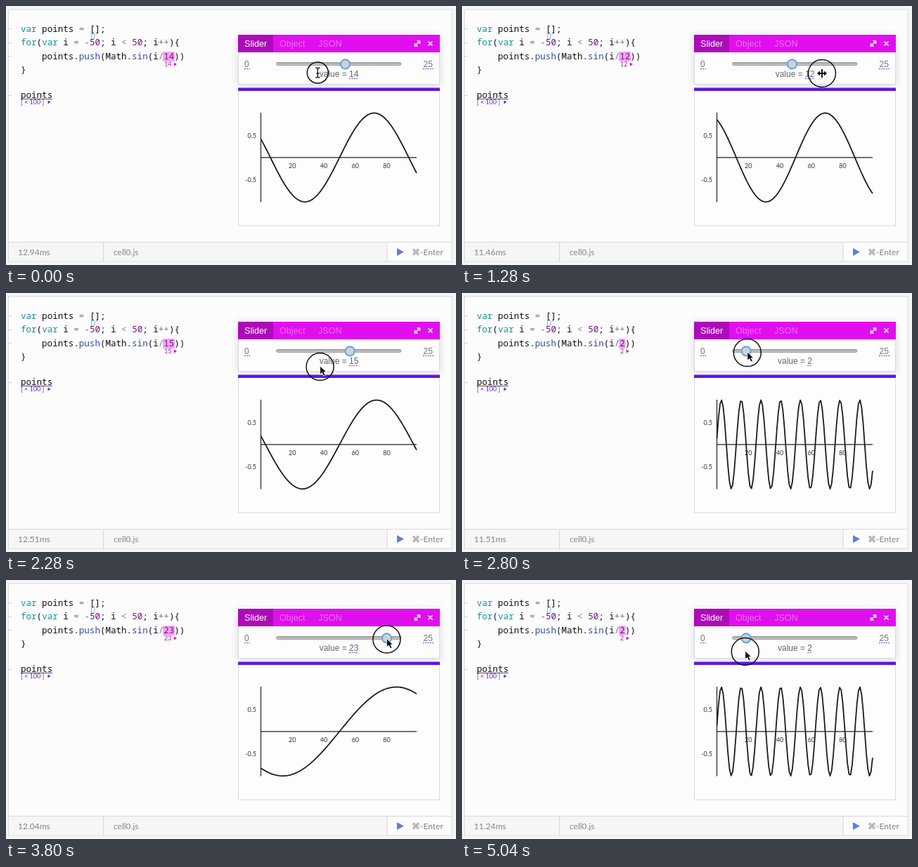
An HTML page that plays this animation: 640x369 px, repeating every 5.08 s.

```html
<!DOCTYPE html>
<html lang="en">
<head>
<meta charset="utf-8">
<title>Slider and sine plot</title>
<style>
html, body { margin: 0; width: 100%; height: 100%; overflow: hidden; background: #f5f5f5; }
svg { display: block; }
text { white-space: pre; }
.code { font: 12.55px "Noto Sans Mono", monospace; fill: #111; }
.kw { fill: #1591a0; } .num { fill: #770f80; } .op { fill: #777; } .fn { fill: #2f4f9f; }
.lato { font-family: Lato, sans-serif; }
.bar { font-size: 12px; fill: #858585; }
.note { font-size: 9px; }
.axis { font-size: 9px; fill: #333; }
.ui { font: 12px "Liberation Sans", Arial, sans-serif; fill: #777; }
.tab { font-size: 12.6px; fill: #fff; }
.dots { stroke: #5a3fc0; stroke-dasharray: 2 1.3; }
.white { stroke: #fff; stroke-width: 1.6; fill: none; }
</style>
</head>
<body>
<svg width="640" height="369" viewBox="0 0 640 369">
  <defs>
    <filter id="shadow" x="-10%" y="-20%" width="120%" height="150%">
      <feDropShadow dx="0" dy="1" stdDeviation="5" flood-color="#447" flood-opacity=".2"/>
    </filter>
    <linearGradient id="groove" x2="0" y2="1">
      <stop stop-color="#8e8e8e"/><stop offset=".4" stop-color="#bbb"/><stop offset="1" stop-color="#c8c8c8"/>
    </linearGradient>
  </defs>

  <rect x="3.5" y="5" width="630.5" height="359" fill="#fcfcfc" stroke="#d9d9de"/>
  <rect x="4" y="336" width="538" height="27.5" fill="#f6f6f6"/>
  <path d="M4 336.5H634M138.5 336V364M542 336V364" stroke="#d6d6e6"/>
  <path d="M3 32.5h5M3 52.5h5M3 71.5h5M3 127.5h5" stroke="#ccc"/>

  <rect id="mark" x="223" y="65" height="14" fill="#f3a6f3"/>
  <g class="code">
    <text x="21" y="37"><tspan class="kw">var</tspan> points <tspan class="op">=</tspan> [];</text>
    <text x="21" y="56"><tspan class="kw">for</tspan>(<tspan class="kw">var</tspan> i <tspan class="op">=</tspan> <tspan class="op">-</tspan><tspan class="num">50</tspan>; i <tspan class="op">&lt;</tspan> <tspan class="num">50</tspan>; i<tspan class="op">++</tspan>){</text>
    <text x="51.1" y="76">points.<tspan class="fn">push</tspan>(Math.<tspan class="fn">sin</tspan>(i<tspan class="op">/</tspan><tspan class="num" id="codeValue"></tspan>))</text>
    <text x="21" y="95">}</text>
    <text x="21" y="131">points</text>
  </g>
  <path d="M21 132.5H66" stroke="#555"/>
  <path d="M123 39.5h-1.5v6.500h1.500M124.500 39.500h1.500v6.500h-1.500" fill="none" stroke="#7fb4e6"/>
  <g class="lato note">
    <text x="21" y="140" fill="#6a22e0">[ × 100 ]</text><path d="M59.500 134.500v5l4-2.500z" fill="#6a22e0"/>
    <text id="hint" x="225" y="86" fill="#c210c8"></text><path id="hintArrow" d="M0 80.500v5l4-2.500z" fill="#c210c8"/>
  </g>

  <g class="lato bar">
    <text id="ms" x="17" y="355"></text>
    <text x="153" y="355">cell0.js</text>
    <text x="577" y="355">⌘-Enter</text>
  </g>
  <path d="M556 345v11l10-5.500z" fill="#5b7fe0"/>

  <rect x="330.500" y="41.500" width="286" height="70" fill="#fdfdfd" stroke="#d9d9e0" filter="url(#shadow)"/>
  <rect x="330" y="41" width="287" height="25" fill="#e00fee"/>
  <rect x="330" y="41" width="50" height="25" fill="#ad0bb8"/>
  <g class="ui">
    <text class="tab" x="339" y="57.500">Slider</text>
    <text class="tab" x="389" y="57.500" opacity=".4">Object</text>
    <text class="tab" x="444" y="57.500" opacity=".4">JSON</text>
    <text x="339" y="87">0</text>
    <text x="593.500" y="87">25</text>
    <text id="label" x="473.500" y="101" text-anchor="middle" fill="#666"></text>
  </g>
  <path class="white" d="M582 56.500L588 50.500M584.500 50H588.500V54M581.500 53V57H585.500M600.500 50.500l6 6M606.500 50.500l-6 6"/>
  <path class="dots" d="M339 89.500h8M593 89.500h15"/>
  <path id="valueDots" class="dots"/>
  <rect x="384.500" y="80.500" width="177.500" height="4" rx="2" fill="url(#groove)" stroke="#8d8d8d" stroke-width=".8"/>
  <circle id="knob" cy="82.800" r="6.600" fill="#cdd1d5" stroke="#62a5e0" stroke-width="2"/>

  <rect x="330.500" y="118" width="286" height="195" fill="#fdfdfd" stroke="#d9d9e0"/>
  <rect x="330" y="116.500" width="287" height="4.500" fill="#5b18e8"/>
  <path d="M362.500 152V279.500M362 215.800H584" stroke="#222" stroke-width="1.200"/>
  <g class="lato axis" text-anchor="middle">
    <text x="407.200" y="230.500">20</text><text x="452" y="230.500">40</text>
    <text x="496.700" y="230.500">60</text><text x="541.400" y="230.500">80</text>
    <g text-anchor="end"><text x="356" y="187.500">0.5</text><text x="356" y="250.500">-0.5</text></g>
  </g>
  <path id="curve" fill="none" stroke="#1c1c1c" stroke-width="1.800" stroke-linejoin="round"/>

  <g id="pointer">
    <circle id="ring" fill="none" stroke="#111" stroke-width="1.500"/>
    <path id="beam" d="M-3-7q3 0 3 2q0-2 3-2M0-5V5M-3 7q3 0 3-2q0 2 3 2M-2 1h4" fill="none" stroke="#111" stroke-width="1.300"/>
    <path id="arrow" d="M0-1V11L3 8.500L5 13L7.500 12L5.500 7.500H9Z" fill="#111" stroke="#fff" stroke-width=".8"/>
    <path id="move" d="M-7 0l4-3.500v2.500h2v-5h2v5h2v-2.500l4 3.500l-4 3.500v-2.500h-2v5h-2v-5h-2v2.500z" fill="#111"/>
  </g>
</svg>
<script>
const LOOP = 5080, LAG = 180;
// time, pointer position in slider units, pointer y, run time shown
const path = [
  [-180, 14, 91, 12.94], [0, 8, 95, 12.94], [250, 2, 84, 9.61], [600, 2, 86, 11.05],
  [780, 3, 95, 11.31], [960, 8, 102, 11.19], [1100, 12, 101, 11.22], [1280, 18.5, 96, 11.46],
  [1500, 23, 84, 12.17], [1760, 23, 86, 9.83], [2100, 15, 101, 11.72], [2280, 8.5, 105, 12.51],
  [2560, 2, 84, 11.38], [2900, 2.5, 86, 10.27], [3180, 7, 92, 12.36], [3360, 16.4, 94, 13.74],
  [3600, 23, 84, 11.65], [3880, 23, 85, 12.08], [4180, 20, 95, 11.9], [4360, 11.6, 98, 10.59],
  [4620, 3, 84, 9.77], [4860, 2, 93, 11.02], [5040, 1.8, 102, 11.24], [5080, 1.8, 102, 11.24]
];
const $ = id => document.getElementById(id);
const show = (id, on) => $(id).style.display = on ? '' : 'none';
const toX = value => 391 + 6.54 * value;
const segment = t => Math.max(0, path.findLastIndex(p => p[0] <= t));

function slope(i, k) {
  const a = path[i - 1], b = path[i], c = path[i + 1];
  if (!a || !c) return 0;
  const left = (b[k] - a[k]) / (b[0] - a[0]), right = (c[k] - b[k]) / (c[0] - b[0]);
  return left * right > 0 ? 2 * left * right / (left + right) : 0;
}

// Monotone cubic through column k
function sample(t, k) {
  const i = Math.min(segment(t), path.length - 2), a = path[i], b = path[i + 1];
  const d = b[0] - a[0], u = (t - a[0]) / d, s = u * u * (3 - 2 * u);
  return a[k] + (b[k] - a[k]) * s
    + d * u * (1 - u) * (slope(i, k) * (1 - u) - slope(i + 1, k) * u);
}

const valueAt = t => Math.max(1, Math.round(sample(Math.max(t - LAG, -LAG), 1)));

function draw(t) {
  const value = valueAt(t), digits = String(value).length;
  $('codeValue').textContent = value;
  $('mark').setAttribute('width', 2 + 7.53 * digits);
  $('hint').textContent = value;
  $('hintArrow').setAttribute('transform', `translate(${228.5 + 5.2 * digits})`);

  $('label').textContent = 'value = ' + value;
  const end = 473.5 + 21.2 + 3.35 * digits;
  $('valueDots').setAttribute('d', `M${end - 6.7 * digits} 103.5H${end}`);
  $('knob').setAttribute('cx', toX(value));

  const held = path[segment(t)], change = Math.abs(value - valueAt(held[0]));
  $('ms').textContent = (held[3] + 0.13 * (change * 7 % 5)).toFixed(2) + 'ms';

  const points = Array.from({ length: 100 }, (_, i) =>
    `${(362.5 + 2.237 * i).toFixed(2)} ${(215.8 - 63.3 * Math.sin((i - 50) / value)).toFixed(2)}`);
  $('curve').setAttribute('d', 'M' + points.join('L'));

  const x = toX(sample(t, 1)), y = sample(t, 2);
  const overText = y > 90 && y < 99;
  const beam = overText && x > 442 && x < 502, move = overText && x >= 502 && x < 520;
  $('pointer').setAttribute('transform', `translate(${x} ${y})`);
  $('ring').setAttribute('r', beam ? 15 : 19.5);
  show('beam', beam);
  show('move', move);
  show('arrow', !beam && !move);
}

function tick() {
  draw(Math.floor(performance.now() % LOOP / 40) * 40);
  requestAnimationFrame(tick);
}
tick();
</script>
</body>
</html>
```
